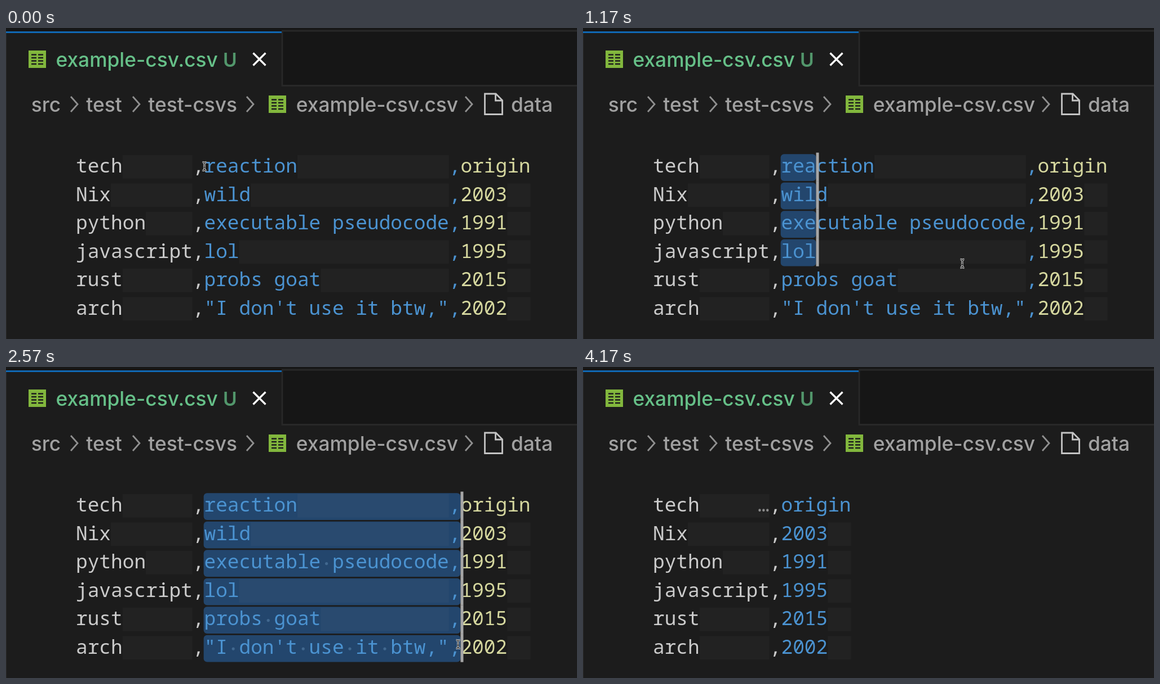
Recreate the animation shown at these times as an HTML page. Size 1013 by 553 pixels, loop 4.23 s.

```html
<!DOCTYPE html>
<html lang="en">
<head>
<meta charset="utf-8">
<title>Column select in a CSV file</title>
<style>
  html, body { margin: 0; width: 100%; height: 100%; overflow: hidden; background: #1c1c1c; }
  svg { display: block; width: 1013px; height: 553px; }
  text { white-space: pre; }
  .ui text { font: 450 35.3px Inter, sans-serif; font-optical-sizing: none; fill: #a1a1a1; }
  .code text { font: 500 34.47px "Noto Sans Mono", monospace; }
  .ui .title { fill: #66c088; }
  .ui .state { font-size: 33.5px; font-weight: 600; fill: #52966b; }
  .line { fill: none; stroke-width: 2.8; }
  .c0 { fill: #cbcbcb; }
  .c1 { fill: #4b93d1; }
  .c2 { fill: #d6d89f; }
  .dim { fill: #8c8c8c; }
  .pad { fill: rgba(128, 128, 128, .06); }
  .sel { fill: #23466d; }
  .dot { fill: #41688f; }
  .caret { fill: #a6a6a6; }
</style>
</head>
<body>
<svg viewBox="0 0 1013 553">
  <defs>
    <g id="sheet">
      <rect width="31" height="31" fill="#82b73d"/>
      <path d="M5 7.5h9M17 7.5h9M5 13h9M17 13h9M5 18.5h9M17 18.5h9M5 24h9M17 24h9" stroke="#1c1c1c" stroke-width="2.7"/>
    </g>
    <path id="chevron" d="M1 0L13 13.5L1 27" class="line" stroke="#909090"/>
    <path id="beam" d="M-3.5 -7.5Q0 -7.5 0 -4.5Q0 -7.5 3.5 -7.5M0 -4.5V4.5M-3.5 7.5Q0 7.5 0 4.5Q0 7.5 3.5 7.5M-2 1.5H2" fill="none"/>
  </defs>
  <rect width="1013" height="553" fill="#1c1c1c"/>
  <rect width="1013" height="6" fill="#161616"/>
  <rect x="490" width="523" height="102" fill="#161616"/>
  <path d="M489 5H1013M490 6V102.5H1013" class="line" stroke="#282828"/>
  <rect y="6" width="489" height="3" fill="#1068b4"/>
  <rect y="9" width="1" height="544" fill="#2b2b2b"/>
  <g class="ui">
    <use href="#sheet" x="40" y="40"/>
    <text x="88.5" y="69" class="title">example-csv.csv</text>
    <text x="385" y="68.5" class="state">U</text>
    <path d="M438.5 44.5L460.5 66.5M460.5 44.5L438.5 66.5" class="line" stroke="#fff" style="stroke-width:3.3"/>
    <text x="44.8" y="149">src</text>
    <use href="#chevron" x="114" y="122"/>
    <text x="142.3" y="149">test</text>
    <use href="#chevron" x="224" y="122"/>
    <text x="252.3" y="149">test-csvs</text>
    <use href="#chevron" x="426" y="122"/>
    <use href="#sheet" x="466" y="120"/>
    <text x="514.8" y="149">example-csv.csv</text>
    <use href="#chevron" x="814" y="122"/>
    <path d="M849.5 117H869L880.5 128.5V153.5H849.5ZM868.5 117V129H880.5" class="line" stroke="#c4c4c4"/>
    <text x="896" y="149">data</text>
  </g>
  <g class="code">
    <g id="marks"></g>
    <g id="before"></g>
    <g id="after"></g>
    <g id="carets"></g>
  </g>
  <g id="mouse">
    <use href="#beam" stroke="#e8e8e8" stroke-width="3.2"/>
    <use href="#beam" stroke="#111" stroke-width="1.2"/>
  </g>
</svg>
<script>
const LOOP = 4230, CELL = 20.68, LEFT = 124, TOP = 221.6, ROW = 50.5;
const FIELD = 11, WIDTH = 21;   // first cell and width of the middle column
const LAG = 40;                 // the selection trails the pointer
const DRAG = 300, HIDE = 3570, CUT = 3600;
const BLINKS = [[2830, 3330], [4100, LOOP]];

const rows = [
  ["tech", "reaction", "origin"],
  ["Nix", "wild", "2003"],
  ["python", "executable pseudocode", "1991"],
  ["javascript", "lol", "1995"],
  ["rust", "probs goat", "2015"],
  ["arch", "\"I don't use it btw,\"", "2002"]
];

// time, x, y
const path = [
  [300, 352, 246], [550, 440, 268], [800, 533, 320], [870, 559, 347],
  [1100, 650, 404], [1330, 724, 452], [1530, 763, 475], [1730, 781, 485],
  [1870, 789, 489], [2100, 796, 491], [2400, 798, 492], [2470, 798, 492],
  [2570, 802, 493]
];

const $ = id => document.getElementById(id);
const cellX = c => LEFT + c * CELL;
const rowY = r => TOP + r * ROW;

function add(parent, tag, attrs, text) {
  const el = document.createElementNS("http://www.w3.org/2000/svg", tag);
  for (const k in attrs) el.setAttribute(k, attrs[k]);
  if (text) el.textContent = text;
  parent.append(el);
  return el;
}

function write(g, r, c, text, cls) {
  add(g, "text", { x: cellX(c), y: rowY(r) + 35.8, class: cls }, text);
}

function cell(g, r, c, text, width, cls) {
  const gap = width - text.length;
  if (gap) add(g, "rect", {
    x: cellX(c + text.length), y: rowY(r) + 4.4, width: gap * CELL, height: 41.5, class: "pad"
  });
  write(g, r, c, text, cls);
}

rows.forEach(([a, b, c], r) => {
  const before = $("before"), after = $("after");
  cell(before, r, 0, a, 10, "c0");
  write(before, r, 10, ",", "c0");
  cell(before, r, FIELD, b, WIDTH, "c1");
  write(before, r, FIELD + WIDTH, ",", "c1");
  cell(before, r, FIELD + WIDTH + 1, c, 6, "c2");
  cell(after, r, 0, a, 10, "c0");
  write(after, r, 10, ",", "c0");
  cell(after, r, FIELD, c, 6, "c1");
});
write($("after"), 0, 9, "…", "dim");

const lines = rows.map(([, b], r) => ({
  len: b.length,
  sel: add($("marks"), "rect", { x: cellX(FIELD) - .8, y: rowY(r) + 2.6, height: 47.7, rx: 6, class: "sel" }),
  caret: add($("carets"), "rect", { y: rowY(r), width: 5, height: ROW + .1, class: "caret" }),
  dots: [...b].flatMap((ch, i) => ch === " " ? [{
    i, el: add($("marks"), "circle", { cx: cellX(FIELD + i + .5), cy: rowY(r) + 27, r: 2.6, class: "dot" })
  }] : [])
}));
// dots lie above every selection box
lines.forEach(l => l.dots.forEach(d => $("marks").append(d.el)));

function pointer(t) {
  if (t <= path[0][0]) return path[0].slice(1);
  const i = path.findIndex(p => p[0] >= t);
  if (i < 0) return path[path.length - 1].slice(1);
  const [t0, x0, y0] = path[i - 1], [t1, x1, y1] = path[i];
  const k = (t - t0) / (t1 - t0);
  return [x0 + (x1 - x0) * k, y0 + (y1 - y0) * k];
}

const show = (el, on) => { el.style.display = on ? "" : "none"; };

function draw(t) {
  const cut = t >= CUT, active = t >= DRAG + 30;
  const [mx, my] = pointer(t), [sx, sy] = pointer(t - LAG);
  const last = cut ? 5 : Math.min(5, Math.floor((sy - TOP) / ROW));
  const reach = Math.round((sx - cellX(FIELD)) / CELL);
  const col = cut ? 0 : Math.min(reach, last === 5 ? WIDTH + 1 : lines[last].len);

  show($("before"), !cut);
  show($("after"), cut);
  show($("mouse"), t < HIDE);
  $("mouse").setAttribute("transform", `translate(${mx} ${my})`);
  show($("carets"), active && !BLINKS.some(([a, b]) => t >= a && t < b));

  lines.forEach((l, r) => {
    const on = active && r <= last;
    const end = last === 5 && col >= WIDTH ? col : Math.min(col, l.len);
    show(l.sel, on && end > 0);
    show(l.caret, on);
    l.sel.setAttribute("width", Math.max(0, end * CELL + .8));
    l.caret.setAttribute("x", cellX(FIELD + end));
    l.dots.forEach(d => show(d.el, on && end > d.i));
  });
}

const start = performance.now();
function tick() {
  draw((performance.now() - start) % LOOP);
  requestAnimationFrame(tick);
}
tick();
</script>
</body>
</html>
```
